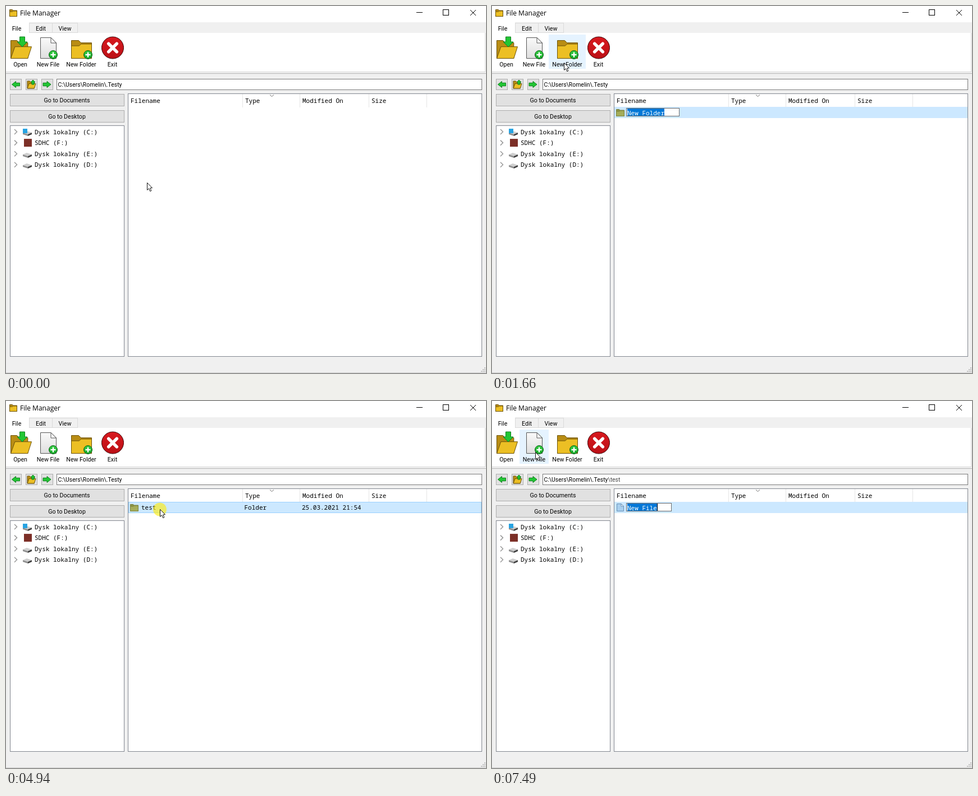
Write an HTML page with a canvas that moves like this. It is 855 px wide and 655 px high and loops after 7.99 s.

```html
<!DOCTYPE html>
<html lang="en">
<head>
<meta charset="utf-8">
<title>File Manager</title>
<style>
html, body { margin: 0; width: 100%; height: 100%; overflow: hidden; background: #f0f0f0; }
canvas { display: block; }
</style>
</head>
<body>
<canvas id="stage" width="855" height="655"></canvas>
<script>
const ctx = document.getElementById('stage').getContext('2d');
const LOOP = 7990;
const MONO = '11px "Noto Sans Mono", "DejaVu Sans Mono", monospace';
const UI = '10.6px Roboto, "Open Sans", sans-serif';
const PATH_FONT = '10.4px Roboto, "Open Sans", sans-serif';
const TITLE = '12px "Open Sans", "Noto Sans", sans-serif';
const GOLD = { back: '#b98d14', front: '#ecbf24', line: '#6b5108' };
const OLIVE = { back: '#8c9447', front: '#a5ad5a', line: '#7c843c' };

// --- drawing helpers ---
function fill(x, y, w, h, color) {
  ctx.fillStyle = color;
  ctx.fillRect(x, y, w, h);
}
function box(x, y, w, h, color, border) {
  fill(x, y, w, h, border);
  fill(x + 1, y + 1, w - 2, h - 2, color);
}
function shape(points, color, line) {
  ctx.beginPath();
  points.forEach(p => ctx.lineTo(...p));
  ctx.closePath();
  ctx.fillStyle = color;
  ctx.fill();
  if (!line) return;
  ctx.strokeStyle = line;
  ctx.lineWidth = 1;
  ctx.stroke();
}
function stroke(color, width, ...points) {
  ctx.strokeStyle = color;
  ctx.lineWidth = width;
  ctx.beginPath();
  points.forEach(p => ctx.lineTo(...p));
  ctx.stroke();
}
function cross(x, y, r, color, width) {
  stroke(color, width, [x - r, y - r], [x + r, y + r]);
  stroke(color, width, [x + r, y - r], [x - r, y + r]);
}
function disc(x, y, r, color, line) {
  ctx.beginPath();
  ctx.arc(x, y, r, 0, Math.PI * 2);
  ctx.fillStyle = color;
  ctx.fill();
  if (!line) return;
  ctx.strokeStyle = line;
  ctx.lineWidth = 1;
  ctx.stroke();
}
function text(str, x, y, font = MONO, color = '#000', align = 'left') {
  ctx.font = font;
  ctx.fillStyle = color;
  ctx.textAlign = align;
  ctx.fillText(str, x, y);
}
function vertical(top, bottom, y, h) {
  const g = ctx.createLinearGradient(0, y, 0, y + h);
  g.addColorStop(0, top);
  g.addColorStop(1, bottom);
  return g;
}
function mix(a, b, p) {
  return `rgb(${a.map((v, i) => Math.round(v + (b[i] - v) * p))})`;
}

// --- pointer motion: from, until, x, y, easing ---
const STEP = 60;
const linear = u => u;
const smooth = u => u * u * (3 - 2 * u);
const easeOut = u => u * (2 - u);
const legs = [
  [0, 720, 127, 115, smooth],
  [720, 840, 128, 101, linear],
  [2200, 2210, 131, 103, linear],
  [3770, 4120, 232, 216, easeOut],
  [4120, 4420, 274, 193, easeOut],
  [5380, 6090, 77, 91, smooth]
];
function pointer(t) {
  let x = 251, y = 315;
  for (const [from, until, toX, toY, ease] of legs) {
    if (t < from) break;
    const steps = Math.max(1, Math.round((until - from) / STEP));
    const u = Math.floor(steps * (t - from) / (until - from) + 0.001) / steps;
    const p = ease(Math.min(1, u));
    x += (toX - x) * p;
    y += (toY - y) * p;
  }
  return [Math.round(x), Math.round(y)];
}
function over(t, x, y, w, h) {
  const [px, py] = pointer(t);
  return px >= x && px < x + w && py >= y && py < y + h;
}
// Hover colour fades away after the pointer leaves.
function glow(t, ...area) {
  const FADE = 150;
  for (let d = 0; d < FADE && d <= t; d += 10)
    if (over(t - d, ...area)) return 1 - d / FADE;
  return 0;
}
const during = (t, a, b) => t >= a && t < b;

// --- icons ---
function badge(x, y) {
  disc(x, y, 7.5, vertical('#35d043', '#14a326', y - 8, 16), '#0b5c16');
  fill(x - 4.5, y - 1.2, 9, 2.4, '#fff');
  fill(x - 1.2, y - 4.5, 2.4, 9, '#fff');
}
function folderBack(x, y, w, h, { back, line }) {
  const lip = h * 0.13, tab = w * 0.36;
  shape([[x, y + h], [x, y], [x + tab, y], [x + tab + lip, y + lip], [x + w, y + lip], [x + w, y + h]], back, line);
}
function folder(x, y, w, h, look) {
  folderBack(x, y, w, h, look);
  const top = y + h * 0.2, step = h * 0.1;
  shape([[x, y + h], [x, top + step], [x + w * 0.38, top + step], [x + w * 0.48, top],
    [x + w, top], [x + w, y + h]], look.front, look.line);
}
function openFolder(x, y, w, h) {
  folderBack(x, y, w * 0.82, h, GOLD);
  const top = y + h * 0.35;
  shape([[x, y + h], [x + w * 0.2, top], [x + w, top], [x + w * 0.82, y + h]], GOLD.front, GOLD.line);
}
function page(x, y, w, h, fold, color, line) {
  shape([[x, y], [x + w - fold, y], [x + w, y + fold], [x + w, y + h], [x, y + h]], color, line);
  shape([[x + w - fold, y], [x + w, y + fold], [x + w - fold, y + fold]], '#fff', line);
}
// Arrow pointing right before it is turned; r is half its length.
function arrow(x, y, r, wide, turn) {
  ctx.save();
  ctx.translate(x, y);
  ctx.rotate(turn * Math.PI / 2);
  const stem = wide / 2;
  shape([[-r, -stem], [0, -stem], [0, -wide], [r, 0], [0, wide], [0, stem], [-r, stem]], '#22c634', '#0f7f1d');
  ctx.restore();
}
function drive(y) {
  const slab = (x, w, rise, h, color) => shape([[x, y], [x + w, y + rise], [x + w, y + rise + h], [x, y + h]], color);
  shape([[30, y], [37, y - 3], [46, y], [39, y + 3]], '#cfcfcf');
  slab(30, 9, 3, 3, '#8f8f8f');
  shape([[39, y + 3], [46, y], [46, y + 3], [39, y + 6]], '#3f3f3f');
}

// --- window parts ---
function titleBar() {
  fill(0, 0, 855, 29, '#fff');
  folder(6.5, 6.5, 13, 12, GOLD);
  text('File Manager', 25, 16.5, TITLE);
  fill(731, 11, 11, 1, '#000');
  ctx.strokeStyle = '#000';
  ctx.lineWidth = 1;
  ctx.strokeRect(778.5, 6.5, 10, 10);
  cross(832, 12, 5, '#000', 1);
}
function toolbar(t) {
  fill(0, 48, 854, 70, '#dadada');
  fill(0, 48, 853, 69, '#fff');
  box(41, 30, 42, 18, '#f0f0f0', '#dadada');
  box(82, 30, 46, 18, '#f0f0f0', '#dadada');
  fill(0, 28, 41, 21, '#fff');
  ['File', 'Edit', 'View'].forEach((s, i) => text(s, 19 + i * 43, 43.5, UI, '#000', 'center'));
  fill(0, 120, 855, 1, '#b4b4b4');

  const pressed = during(t, 900, 1200) || during(t, 6270, 6400);
  let x = 2;
  for (const [name, w] of [['Open', 47], ['New File', 52], ['New Folder', 66], ['Exit', 45]]) {
    if (over(t, x, 51, w, 61)) fill(x, 51, w, 61, pressed ? '#cce8ff' : '#e5f3ff');
    text(name, x + w / 2, 107.5, UI, '#000', 'center');
    x += w;
  }
  openFolder(8.5, 61.5, 37, 32);
  arrow(29, 64, 9, 9, 1);
  page(61.5, 56.5, 28, 37, 9.5, vertical('#fafafa', '#dedede', 56, 38), '#555');
  badge(84, 87);
  folder(116.5, 61.5, 36, 32, GOLD);
  badge(146, 87);
  disc(190, 74.5, 19.5, vertical('#d8191f', '#bb1016', 55, 39), '#3c0508');
  ctx.lineCap = 'round';
  cross(190, 74.5, 7.3, '#fff', 5.5);
  ctx.lineCap = 'butt';
}
function navigation(t) {
  for (let i = 0; i < 3; i++) box(7 + i * 28, 130, 21, 20, '#e1e1e1', '#adadad');
  arrow(17.5, 140, 7, 5.5, 2);
  openFolder(38, 134, 15, 13);
  arrow(48, 136, 4, 4, 3);
  arrow(73, 140, 7, 5.5, 0);
  box(90, 130, 758, 20, '#fff', over(t, 90, 130, 758, 20) ? '#171717' : '#7a7a7a');
  const path = 'C:\\Users\\Romelin\\.Testy';
  text(path, 92.5, 144, PATH_FONT);
  if (t >= 5070) text('\\test', 92.5 + ctx.measureText(path).width, 144, PATH_FONT, '#444');
}
function sidebar(t) {
  ['Go to Documents', 'Go to Desktop'].forEach((name, i) => {
    const y = 157 + i * 29;
    const g = glow(t, 7, y, 204, 22);
    box(7, y, 204, 22, mix([225, 225, 225], [229, 241, 251], g), mix([173, 173, 173], [0, 120, 215], g));
    text(name, 108.5, y + 15, UI, '#000', 'center');
  });
  box(7, 213, 204, 413, '#fff', '#828790');
  ['Dysk lokalny (C:)', 'SDHC (F:)', 'Dysk lokalny (E:)', 'Dysk lokalny (D:)'].forEach((name, i) => {
    const y = 224.5 + i * 19.6;
    stroke('#9a9a9a', 1.5, [15, y - 4.5], [19.5, y], [15, y + 4.5]);
    if (i === 1) fill(32, y - 7, 14, 14, '#7c2f27');
    else drive(Math.round(y) + 1);
    if (i === 0) fill(30, 219, 8, 8, '#27a3e2');
    text(name, 51, y + 4);
  });
}
function editor(name, right, selected, caret) {
  box(239, 182, right - 239, 15, '#fff', '#6a6a6a');
  ctx.font = MONO;
  const end = Math.round(241 + ctx.measureText(name).width);
  if (selected) fill(241, 183, end - 241, 13, '#0078d7');
  text(name, 241, 194.5, MONO, selected ? '#fff' : '#000');
  if (caret) fill(end, 183, 1, 13, '#000');
}
function row(color, border = color) {
  box(218, 180, 629, 20, color, border);
}
function table(t) {
  box(217, 156, 631, 470, '#fff', '#828790');
  const columns = { 'Filename': 217, 'Type': 421, 'Modified On': 523, 'Size': 646, '': 749 };
  for (const [name, x] of Object.entries(columns)) {
    if (x > 217) fill(x, 157, 1, 24, '#e5e5e5');
    text(name, x + 5, 173);
  }
  stroke('#6e6e6e', 1, [470, 158.5], [473.5, 161.5], [477, 158.5]);

  if (during(t, 1200, 5070)) {
    const editing = t < 3010;
    if (editing) row('#cce8ff');
    else if (over(t, 218, 180, 629, 20)) row('#cce8ff', '#99d1ff');
    else row('#d9d9d9');
    folder(221.5, 184.5, 14, 12, OLIVE);
    if (!editing) {
      text('test', 241, 194);
      text('Folder', 424.5, 194);
      text('25.03.2021 21:54', 527, 194);
    } else if (t < 2410) {
      editor('New Folder', 334, true, !during(t, 1660, 2210));
    } else {
      editor('test'.slice(0, 1 + Math.floor((t - 2410) / 163)), 310, false, true);
    }
  } else if (t >= 6400) {
    row('#cce8ff');
    page(222.5, 183.5, 12, 13, 4.5, '#a9cfee', '#6690b6');
    editor('New File', 320, true, !during(t, 6920, 7490));
  }
}
function statusBar() {
  fill(0, 654, 855, 1, '#d0d0d0');
  for (let r = 0; r < 3; r++)
    for (let c = 2 - r; c < 3; c++) fill(846 + c * 3, 645 + r * 3, 2, 2, '#bcbcbc');
}
function drawPointer(t) {
  const [x, y] = pointer(t);
  const clicked = [900, 4810, 4940, 6270].some(at => during(t, at, at + STEP));
  if (clicked) disc(x, y + 0.5, 12, 'rgba(255,235,0,.6)');
  shape([[0, 0], [0, 13], [3, 10.2], [5.2, 15.2], [7.4, 14.2], [5.3, 9.4], [9, 9.2]]
    .map(([a, b]) => [x + 0.5 + a, y + 0.5 + b]), '#fff', '#111');
}

function draw(t) {
  fill(0, 0, 855, 655, '#f0f0f0');
  titleBar();
  toolbar(t);
  navigation(t);
  sidebar(t);
  table(t);
  statusBar();
  drawPointer(t);
}

const begin = performance.now();
function tick() {
  draw((performance.now() - begin) % LOOP);
  requestAnimationFrame(tick);
}
tick();
</script>
</body>
</html>
```
